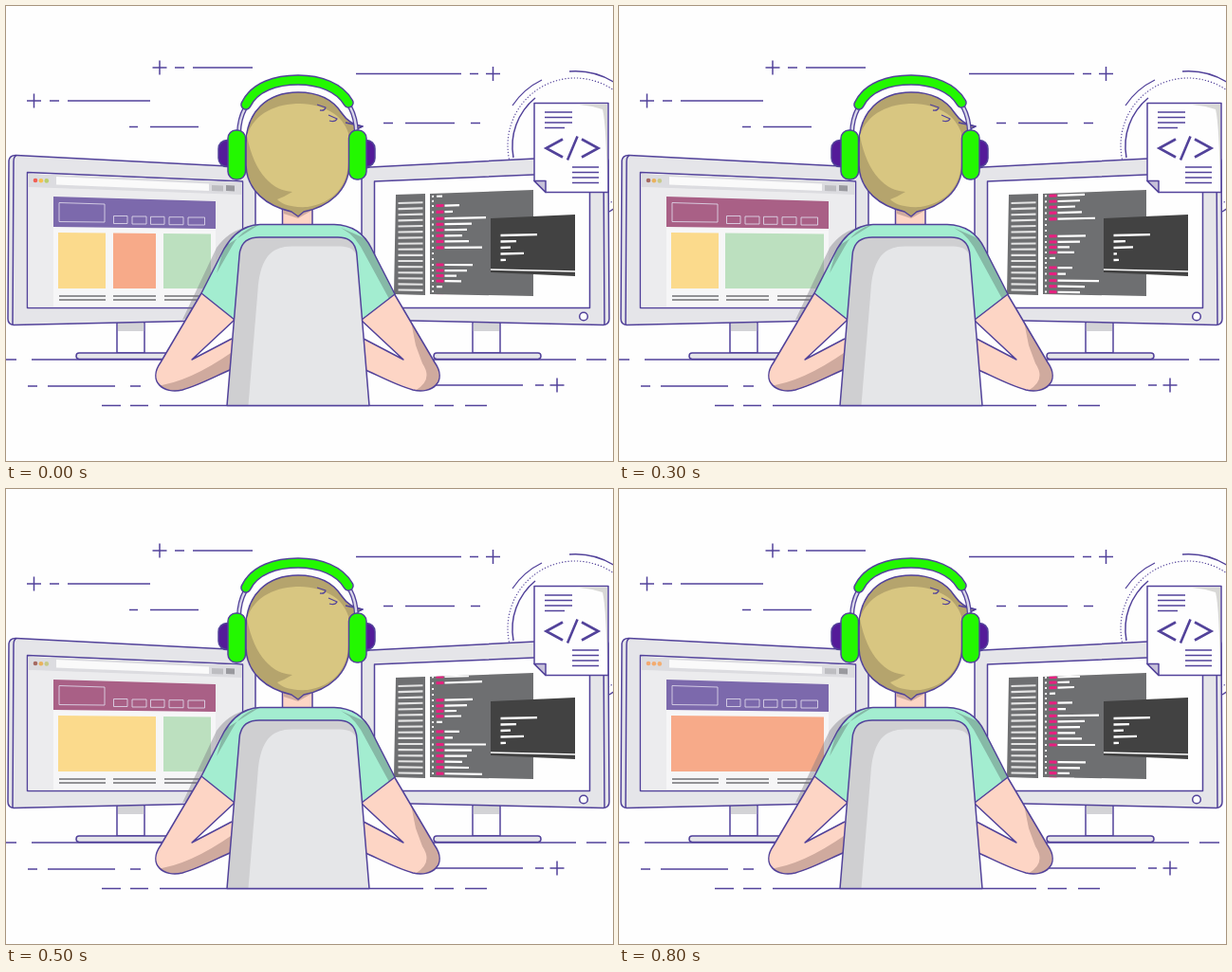
Recreate the animation shown at these times as an HTML page. Size 640x480 px, loop 900 ms.

```html
<!DOCTYPE html>
<html lang="en">
<head>
<meta charset="utf-8">
<title>Developer at work</title>
<style>
  html, body { margin: 0; width: 100%; height: 100%; overflow: hidden; background: #fefefe; }
  svg { display: block; width: 100%; height: 100%; }
  .line { fill: none; stroke: #52429a; stroke-width: 1.5; stroke-linejoin: round; }
  .shape { stroke: #52429a; stroke-width: 1.5; stroke-linejoin: round; }
  .skin { fill: #fdd5c5; }
  .skin-shade { fill: #cfaa9e; }
  .frame { fill: #e5e5e9; }
  .green { fill: #23f800; }
  .cup { fill: #541b99; }
</style>
</head>
<body>
<svg viewBox="0 0 640 480" xmlns="http://www.w3.org/2000/svg">
  <defs>
    <clipPath id="codeClip"><path d="M447 198L556 194V306L447 304Z"/></clipPath>
    <clipPath id="armClip"><path d="M206 303L163 376C149 396 166 410 186 405C204 400 222 390 238 383V351L196 373L241 331Z"/></clipPath>
    <clipPath id="shirtClip"><path id="shirtPath" d="M268 230.500H346C368 231 380 244 386 257L410 304L375 331H241L206 303L229.500 257C237 244 248 231 268 230.500Z"/></clipPath>
    <g id="monitor">
      <path class="shape" fill="#fefefe" d="M117 334H146V366H117Z"/>
      <path fill="#d3d3d6" d="M118 334H145.200V343H118Z"/>
      <rect class="shape frame" x="74" y="366" width="113" height="6.500" rx="3.200"/>
      <path class="shape frame" d="M11 157.500L254 170Q263 170.500 263 179V324Q263 331 256 331L8 336.500Q2 336 2 330L3 163Q4 157 11 157.500Z"/>
      <path class="line" d="M11 157.500Q8 159 8 164L7 336"/>
      <path class="shape" fill="#fefefe" d="M22.500 175.500L249.500 185V318.500H22.500Z"/>
    </g>
    <path id="arm" class="skin" d="M206 303L163 376C149 396 166 410 186 405C204 400 222 390 238 383V351L196 373L241 331Z"/>
  </defs>

  <path class="line" id="dashes"/>

  <g class="line">
    <path d="M535 160A66 66 0 0 1 558 97"/>
    <path stroke-width="1.300" d="M534 105A78 78 0 0 1 565 78M594 69A78 78 0 0 1 645 83M645 210Q640 215 636 217"/>
    <circle cx="600" cy="147" r="71" style="stroke-width:1.100" stroke-dasharray="1.300 1.900"/>
  </g>

  <use href="#monitor"/>
  <use href="#monitor" transform="translate(638) scale(-1 1)"/>
  <circle class="shape" cx="609" cy="327.500" r="4.300" fill="#fefefe"/>

  <!-- Browser window -->
  <path fill="#ececee" d="M23.500 177L248.500 186V317.500H23.500Z"/>
  <path fill="#dcdce0" d="M23.500 177L248.500 186V199L23.500 191Z"/>
  <path fill="#fafafa" d="M53 180L214 187.500V195L53 188.500Z"/>
  <path fill="#bdbdc1" d="M217 189L229 189.500V195.500L217 195Z"/>
  <path fill="#99999e" d="M232 189L241 189.500V195.500L232 195Z"/>
  <path fill="#f6f6f7" d="M50 201L221 206V317H50Z"/>
  <g id="page"></g>
  <path fill="none" stroke="#e0daeb" stroke-opacity=".85" d="M56 207.500L104 209V228L56 227.500ZM113.500 221.500H128V229.500H113.500ZM133 222H148V230H133ZM152.500 222.300H167V230.300H152.500ZM172 222.700H187V230.700H172ZM192 223H209.500V231H192Z"/>
  <path fill="none" stroke="#707074" stroke-width="1.500" d="M56 306H105M113 306H158M167 306H205M56 310H105M113 310H158M167 310H201"/>

  <!-- Code editor -->
  <path fill="#6e6f71" d="M411 199L442 198V305L409 304ZM447 198L556 194V306L447 304Z"/>
  <path id="sidebar" fill="none" stroke="#e4e4e4" stroke-width="2.100"/>
  <g id="code" clip-path="url(#codeClip)"></g>
  <path fill="#424242" d="M511 224L600 220V285L511 281Z"/>
  <path stroke="#fff" stroke-width="1.600" d="M511 278L600 280"/>
  <path id="terminal" fill="none" stroke="#fff" stroke-width="2.300"/>

  <!-- Document -->
  <path class="shape" fill="#fefefe" d="M557 102.500H635V196.500H569L557 184.500Z"/>
  <path fill="#d8d8d6" d="M601 103.500H634V195.500Q633 125 629 109Q616 105 601 103.500Z"/>
  <path class="shape" fill="#c6c1d8" d="M557 184.500H569V196.500Z"/>
  <path class="line" d="M568 112H597M568 117.500H597M568 123H597M568 128.500H589M597 170H625M597 175.500H625M597 181H625M597 186.500H625"/>
  <path class="line" style="stroke-width:2.600;stroke-linejoin:miter" d="M587 140.500L569.500 150L587 159.500M602.500 137.500L592 162.500M607 140.500L624.500 150L607 159.500"/>

  <!-- Arms -->
  <path fill="#77747d" opacity=".4" d="M262 231Q236 235 222 255L186 331L192 329L232 257Z"/>
  <use href="#arm"/>
  <use href="#arm" transform="translate(615) scale(-1 1)"/>
  <path class="skin-shade" clip-path="url(#armClip)" d="M155 401Q190 399 240 364V412H155Z"/>
  <g transform="translate(615) scale(-1 1)">
    <path class="skin-shade" clip-path="url(#armClip)" d="M188 333L183 358L176 377Q164 395 184 406L150 410V370Z"/>
  </g>
  <path id="armLine" class="line" d="M206 303L163 376C149 396 166 410 186 405C204 400 222 390 238 383M238 351L196 373L241 331"/>
  <use href="#armLine" transform="translate(615) scale(-1 1)"/>

  <!-- Shirt, neck and head -->
  <path class="shape skin" d="M291.500 208V231H323V208Z"/>
  <path class="skin-shade" d="M292.500 210H322V216L308 224L292.500 219Z"/>
  <use href="#shirtPath" fill="#a3edd0"/>
  <g clip-path="url(#shirtClip)" fill="#86b9a6">
    <path d="M344 230Q364 237 374 254L404 309L412 304L385 248Z"/>
    <path d="M268 230Q247 236 238 254L222 282L230 254Z"/>
  </g>
  <use href="#shirtPath" class="line"/>
  <path class="shape" fill="#b5a46d" d="M253 146C253 112 275 91 308 91C330 91 345 99 354 113Q362 125 376 127Q370 129 365 133L362 150V168C361 195 340 212 314 217L308 222L301 217C275 211 254 195 253 168Z"/>
  <path fill="#d8c681" d="M254 137C262 112 286 103 310 103C336 104 355 115 361 134V165C360 190 345 208 318 212C298 213 290 208 286 204Q294 201 302 196C282 195 262 178 254 137Z"/>
  <path class="line" style="stroke-width:1.300" d="M328 104L337 107Q336 111 331 110M340 115L349 119Q347 123 341 121M358 123L376 127L366 132"/>

  <!-- Headphones -->
  <g fill="none" stroke-linecap="round">
    <path stroke="#52429a" stroke-width="5" d="M252 108Q246 119 245.500 134M363 107Q369 118 369.500 134"/>
    <path stroke="#d9d6e8" stroke-width="2.400" d="M252 108Q246 119 245.500 134M363 107Q369 118 369.500 134"/>
    <path stroke="#52429a" stroke-width="11.500" d="M253 104C262 85 285 78 308 78C331 78 352 86 361 102"/>
    <path stroke="#23f800" stroke-width="8.600" d="M253 104C262 85 285 78 308 78C331 78 352 86 361 102"/>
  </g>
  <rect class="shape cup" x="224" y="141.500" width="20" height="28" rx="9"/>
  <rect class="shape cup" x="369" y="141.500" width="20" height="28" rx="9"/>
  <rect class="shape green" x="234" y="131" width="18.500" height="52" rx="8.500"/>
  <rect class="shape green" x="361.500" y="131" width="18.500" height="52" rx="8.500"/>

  <!-- Chair -->
  <path fill="#cfcfd1" d="M233 421.500L246 264Q247 244 267 244H350Q369 244 370 264L383 421.500Z"/>
  <path fill="#e5e6e8" d="M255.500 421L265.500 300C268 266 279 253.500 302 253.500H352Q367 253.500 370 264L383 421Z"/>
  <path class="line" d="M233 421.500L246 264Q247 244 267 244H350Q369 244 370 264L383 421.500Z"/>
</svg>
<script>
const STEP = 100, STEPS = 9;
const byId = id => document.getElementById(id);

const row = (y, ...ends) => {
  let d = '';
  for (let i = 0; i < ends.length; i += 2) d += `M${ends[i]} ${y}H${ends[i + 1]}`;
  return d;
};
const plus = (x, y) => `M${x - 7.5} ${y}h15M${x} ${y - 7.5}v15`;

byId('dashes').setAttribute('d', [
  plus(162, 65), row(65, 178, 188, 197, 260),
  plus(29.5, 100), row(100, 46, 56, 65, 152),
  row(127.5, 130, 139, 152, 203),
  row(71.5, 369, 480, 489, 498), plus(513.5, 71.5),
  row(123.5, 398, 408, 421, 473, 490, 500),
  row(373, 0, 11, 27, 166, 449, 601, 612, 633),
  row(401, 23, 33, 44, 115, 131, 142),
  row(400, 452, 545, 558, 567), plus(581, 400),
  row(421.5, 101, 121, 131, 150, 162, 440, 452, 472, 484, 507)
].join(''));

// Lines flatten out towards the lower part of the tilted screen.
const tilted = (x1, x2, y) => {
  const slope = (y - 270) * 0.0005;
  return `M${x1} ${y + (x1 - 447) * slope}L${x2} ${y + (x2 - 447) * slope}`;
};
byId('sidebar').setAttribute('d',
  Array.from({ length: 16 }, (_, i) => tilted(413.5, 439.5, 207 + i * 6.2)).join(''));

// Each code line: vertical offset and right end (0 = blank, under 462 = bracket).
const codeLines = [
  [0, 492], [6, 486], [11.5, 475], [17, 480], [23, 460], [28, 0],
  [33, 478], [39.5, 471], [46.5, 506], [52.5, 491], [58.5, 486],
  [64.5, 481], [70.5, 488], [77, 502], [83, 0], [89, 0]
];
const CODE_HEIGHT = 95;

function drawCode(step) {
  let dots = '', keys = '', text = '';
  for (let block = 0; block < 3; block++) {
    for (const [offset, end] of codeLines) {
      const y = 178 - step * 10 + block * CODE_HEIGHT + offset;
      dots += tilted(449, 451, y);
      if (!end) continue;
      if (end > 462) keys += tilted(453.5, 461.5, y);
      text += tilted(end > 462 ? 462.5 : 454, end, y);
    }
  }
  const stroke = (d, color, width) => `<path d="${d}" stroke="${color}" stroke-width="${width}"/>`;
  byId('code').innerHTML =
    stroke(dots, '#fff', 2) + stroke(keys, '#e6207f', 3.1) + stroke(text, '#fff', 2.2);
}

// Right ends of the five terminal lines.
const outputs = {
  a: [560, 538, 532, 546, 527],
  b: [560, 534, 542, 525, 527],
  c: [534, 552, 525, 546, 527]
};

function drawTerminal(step) {
  const ends = outputs['aabbaacca'[step]];
  byId('terminal').setAttribute('d', ends.map((end, i) => {
    const y = 242 + i * 6.5;
    return `M521.5 ${y}L${end} ${y - (end - 521) * 0.025}`;
  }).join(''));
}

const YELLOW = '#fbda8c', ORANGE = '#f7aa89', GREEN = '#bce0bf';
const layouts = [
  [[55, 105, YELLOW], [113, 158, ORANGE], [166, 216, GREEN]],
  [[55, 105, YELLOW], [112, 216, GREEN]],
  [[55, 158, YELLOW], [166, 216, GREEN]],
  [[55, 216, ORANGE]]
];
const bright = ['#f15f55', '#f6c14f', '#b9cf6c'];
const muted = ['#a56a62', '#e9b25c', '#c6c988'];
const warm = ['#f3a870', '#f3ab70', '#f3ae72'];

function drawPage(step) {
  const layout = +'000112233'[step];
  const mauve = layout === 1 || layout === 2;
  const lights = step === 8 ? warm : mauve ? muted : bright;
  const topAt = x => 239 + (x - 55) * 0.009;
  byId('page').innerHTML =
    `<path fill="${mauve ? '#a96086' : '#7c69ac'}" d="M50 201L221 206V235L50 233Z"/>` +
    layouts[layout].map(([left, right, color]) =>
      `<path fill="${color}" d="M${left} ${topAt(left)}L${right} ${topAt(right)}V298H${left}Z"/>`).join('') +
    lights.map((color, i) =>
      `<circle cx="${31 + i * 5.9}" cy="${184 + i * 0.2}" r="2.300" fill="${color}"/>`).join('');
}

let shown = -1;
function tick() {
  const step = Math.floor(performance.now() / STEP) % STEPS;
  if (step !== shown) {
    shown = step;
    drawPage(step);
    drawCode(step);
    drawTerminal(step);
  }
  requestAnimationFrame(tick);
}
tick();
</script>
</body>
</html>
```
